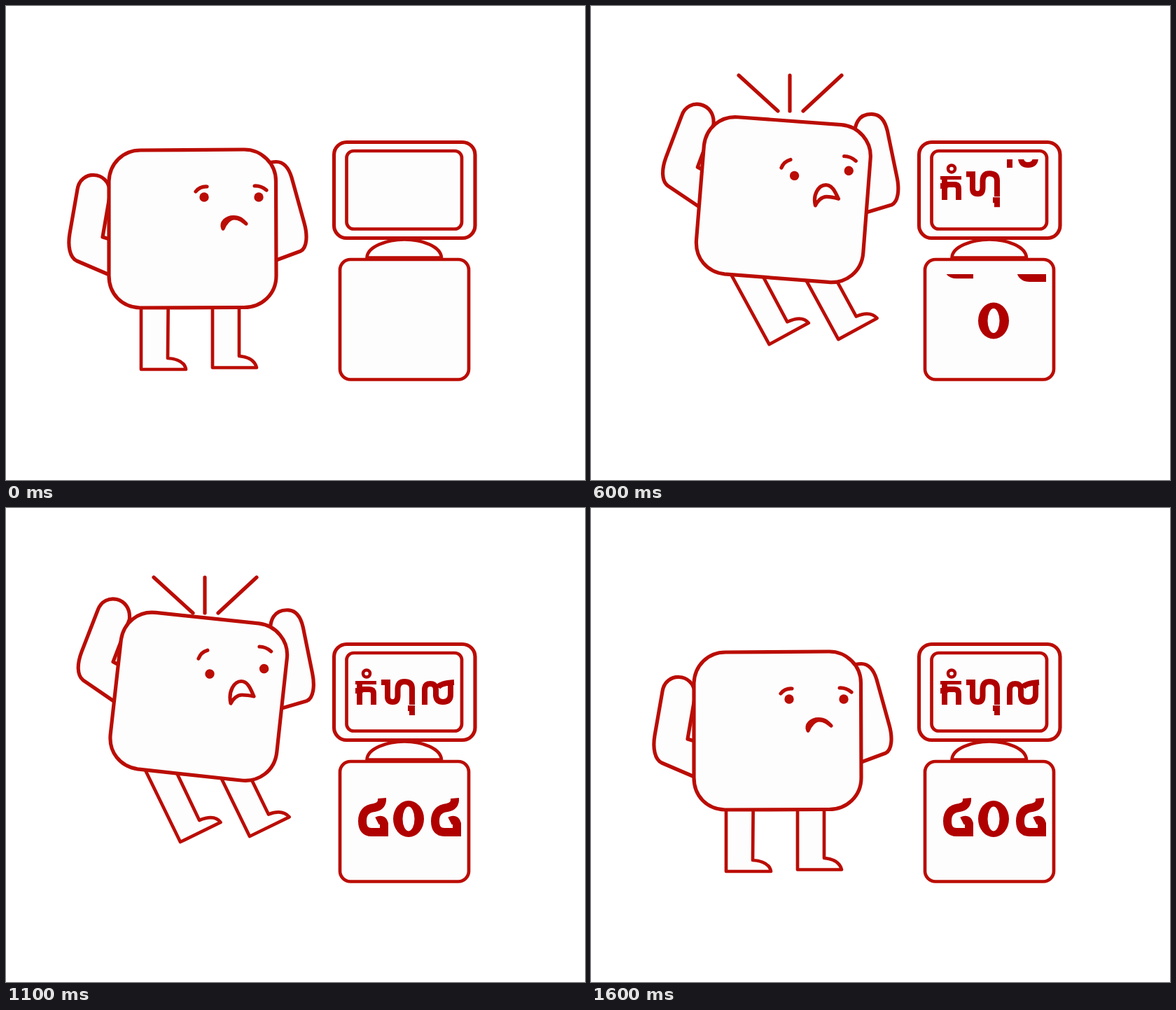
Animation, 827 px wide and 677 px high, one loop 2.01 s. Source, as an HTML page:

```html
<!DOCTYPE html>
<html lang="km">
<head>
<meta charset="utf-8">
<title>404</title>
<style>
  html, body { margin: 0; width: 100%; height: 100%; overflow: hidden; background: #fff; }
  svg { display: block; width: 100vw; height: 100vh; }
  .line { fill: #fdfdfd; stroke: #ba0d05; stroke-width: 5.2; stroke-linecap: round; stroke-linejoin: round; }
  .open { fill: none; }
  .thin { stroke-width: 4.7; }
  .dot { fill: #ba0d05; }
  .ink { fill: none; stroke: #b00000; stroke-width: 8; }
  .digit { fill: none; stroke: #b00000; stroke-width: 12; }
</style>
</head>
<body>
<svg viewBox="0 0 827 677">
  <defs>
    <clipPath id="screenClip"><rect x="490" y="219" width="157" height="88"/></clipPath>
    <clipPath id="caseClip"><rect x="480" y="383" width="178" height="122"/></clipPath>
    <clipPath id="rayClip"><rect x="190" y="80" width="190" height="108"/></clipPath>
    <path id="four" d="M537 414.500Q538 426 526 428Q509 430 509 447Q509 463 522 463H540V451Q538 443 530 447"/>
  </defs>

  <g class="line">
    <rect x="468.500" y="194.500" width="201.500" height="137" rx="18"/>
    <rect class="thin" x="486.500" y="207" width="164.500" height="111.500" rx="10"/>
    <path class="thin" d="M515.500 359.500C516 343 545 333.500 569 333.500C594 333.500 621 343 622 359.500Z"/>
    <rect class="thin" x="477" y="362" width="184" height="171.500" rx="15"/>
  </g>

  <g clip-path="url(#screenClip)" role="img" aria-label="កំហុស">
    <g id="s1" class="ink">
      <circle cx="515" cy="236.500" r="5" stroke-width="4.500"/>
      <path stroke-width="5" d="M499 249.500H529"/>
      <path d="M505 281V265Q505 259 511 259H519Q525 259 525 265V281M499 261H506M505 250V259"/>
    </g>
    <path id="s2" class="ink" d="M536 249H545V269Q545 277 552.500 277Q559.500 277 559.500 268V258Q560 248 569 248Q580 248 580 258V281M574 286H580V296"/>
    <path id="s3" class="ink" d="M598 281V260Q598 251 606 251Q614 251 614 260V268Q615 277 624 277Q635 277 635 266V252M617 256Q621 250 640 249"/>
  </g>

  <g clip-path="url(#caseClip)" role="img" aria-label="៤០៤">
    <use id="d1" href="#four" class="digit"/>
    <path id="d2" fill="#b00000" fill-rule="evenodd" d="M553 444a22 26 0 1 0 44 0a22 26 0 1 0 -44 0M566.500 444a8.500 17.500 0 1 0 17 0a8.500 17.500 0 1 0 -17 0"/>
    <g id="d3"><use href="#four" class="digit" x="104"/></g>
  </g>

  <g class="line">
    <path id="armL" d="M150 385L101 364C91 359 88 343 91 325L102 262C106 234 146 234 149 266L138 330L148 333"/>
    <path id="armR" d="M364 265C357 238 366 222.500 386 222.500C397 222.500 404 232 408 245L426 310C431 328 430 345 421 350L386 363"/>
    <path id="legL" class="thin" d="M193 390V519H257C255 508 245 504 231 503L232 390"/>
    <path id="legR" class="thin" d="M295 390V516.500H358C355 505 345 501 333 500V390"/>
    <path id="body" d="M192 206L340 205C365 205 385.500 225 385.500 250L386 385C386 412 365 430.500 340 430.500L191 431C166 430 147 412 147 385V250C148 225 167 206 192 206Z"/>
    <path id="mouth"/>
    <path id="browL" class="open" d="M271 265Q277 257.500 287 258"/>
    <path id="browR" class="open" d="M355 257Q364 256.500 372 263"/>
  </g>
  <g id="eyes" class="dot">
    <circle cx="283" cy="273" r="6.700"/>
    <circle cx="361" cy="273" r="6.700"/>
  </g>
  <g clip-path="url(#rayClip)">
    <path id="rays" class="line open" d="M211 99L267 150M284 99V150M358 99L303 150"/>
  </g>
</svg>
<script>
const LOOP = 2010, FPS = 30;
const $ = id => document.getElementById(id);
const clamp = x => Math.min(1, Math.max(0, x));
const smooth = x => x * x * (3 - 2 * x);
const easeOut = x => Math.sin(x * Math.PI / 2);

// Monotone cubic through the points (times[i], vals[i]).
function curve(times, vals) {
  const last = times.length - 1;
  const slope = i => (vals[i + 1] - vals[i]) / (times[i + 1] - times[i]);
  const tangent = vals.map((_, i) => {
    if (i === 0 || i === last) return 0;
    const a = slope(i - 1), b = slope(i);
    return a * b <= 0 ? 0 : 2 * a * b / (a + b);
  });
  return t => {
    if (t <= times[0]) return vals[0];
    if (t >= times[last]) return vals[last];
    let i = 0;
    while (t >= times[i + 1]) i++;
    const h = times[i + 1] - times[i], u = (t - times[i]) / h, v = 1 - u;
    return v * v * ((1 + 2 * u) * vals[i] + u * h * tangent[i])
         + u * u * ((3 - 2 * u) * vals[i + 1] - v * h * tangent[i + 1]);
  };
}

// Each channel leaps from 0 to 1, holds, and drops back to 0.
const BEATS = [175, 400, 600, 766, 1267, 1400, 1590];
const channel = (leap, rise, drop) => curve(BEATS, [0, leap, rise, 1, 1, drop, 0]);
const lift  = channel(0.32, 0.85, 0.51);
const tilt  = channel(0.69, 0.72, 0.24);
const reach = channel(0.75, 0.95, 0.54);
const kick  = channel(0.95, 1.1, 0.6);
const burst = channel(0.62, 1, 0.5);

function place(id, dx, dy, angle = 0, px = 0, py = 0) {
  $(id).setAttribute("transform", `translate(${dx} ${dy}) rotate(${angle} ${px} ${py})`);
}

function drawMouth(up, dx) {
  const point = (x, y, rise) => [x + dx, y - rise * up];
  const [lx, ly] = point(310, 318, 39), [tx, ty] = point(325, 301.5, 54);
  const [rx, ry] = point(343, 311, 42), [ix, iy] = point(326, 303, 36);
  $("mouth").setAttribute("d",
    `M${lx} ${ly}C${lx - 4} ${ly - 0.55 * (ly - ty)} ${tx - 10} ${ty} ${tx} ${ty}` +
    `C${tx + 9} ${ty} ${rx - 5} ${ry - 0.55 * (ry - ty)} ${rx} ${ry}` +
    `C${rx - 6} ${ry - 0.6 * (ry - iy)} ${ix + 7} ${iy} ${ix} ${iy}` +
    `C${ix - 7} ${iy} ${lx + 3} ${ly - 0.5 * (ly - iy)} ${lx} ${ly}Z`);
}

function drawFigure(t) {
  const up = lift(t), arm = reach(t), leg = kick(t);
  const startle = smooth(clamp((t - 700) / 200)) * up;
  place("body", 9 * arm, -49 * up, 6.4 * tilt(t), 266.5, 318);
  place("armL", 4 * arm, -49 * up - 60 * arm, 11.3 * arm, 150, 385);
  place("armR", 8 * arm, -49 * up - 28 * arm, 4 * arm, 386, 363);
  place("legL", 56 * leg, -42 * up, -26 * leg, 193, 519);
  place("legR", 53 * leg, -47.5 * up, -26 * leg, 295, 516.5);
  place("eyes", 8 * arm, -36 * up, -5.5 * arm, 283, 273);
  place("browL", arm + 3 * startle, -40 * up - 10 * startle, -19 * arm, 271, 265);
  place("browR", 7 * arm, -50 * up - 9 * startle, 3 * arm, 355, 257);
  place("rays", 0, 94 * (1 - burst(t)));
  drawMouth(up, 11 * arm);
}

// Reels fall through their window, wrap once and settle in place.
const SPIN = 435;
const REELS = [
  { name: "s", half: 80, starts: [216, 240, 347] },
  { name: "d", half: 92, starts: [381, 500, 583] }
];
function drawReels(t) {
  for (const { name, half, starts } of REELS) {
    starts.forEach((start, i) => {
      const fallen = 3 * half * easeOut(clamp((t - start) / SPIN));
      place(name + (i + 1), 0, fallen % (2 * half) - half);
    });
  }
}

const begin = performance.now();
function tick() {
  const t = (performance.now() - begin) % LOOP;
  const step = Math.floor((t + 4) * FPS / 1000) * 1000 / FPS;
  drawFigure(step);
  drawReels(step);
  requestAnimationFrame(tick);
}
tick();
</script>
</body>
</html>
```
